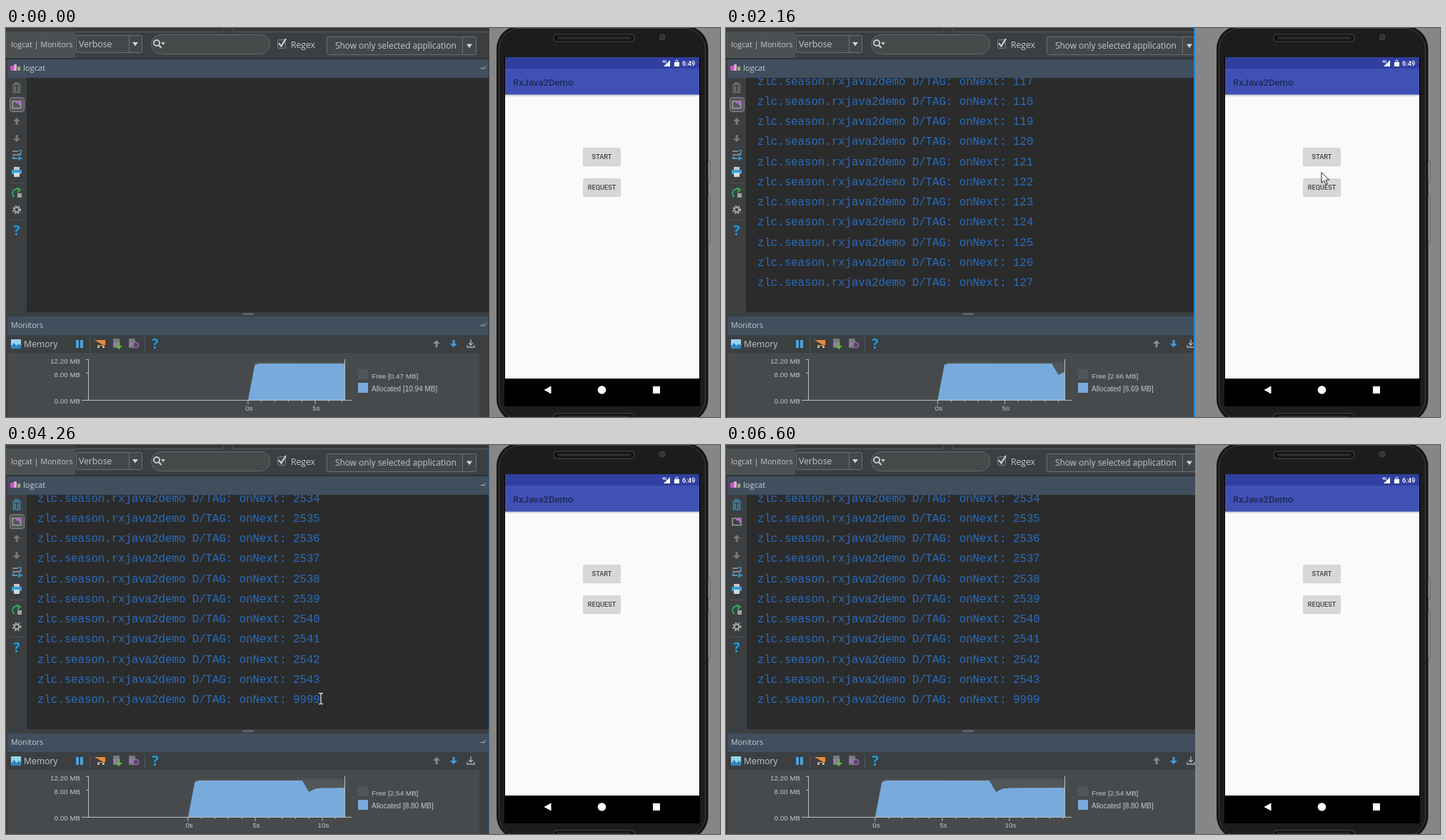
These frames come from a looping animation (1000 px wide and 546 px high, 6660 ms). An HTML page with a canvas:

```html
<!DOCTYPE html>
<html lang="en">
<head>
<meta charset="utf-8">
<title>Logcat demo</title>
<style>
  html, body { margin: 0; width: 100%; height: 100%; overflow: hidden; background: #3c3f41; }
  canvas { display: block; }
</style>
</head>
<body>
<canvas id="stage" width="1000" height="546"></canvas>
<script>
const ctx = document.getElementById('stage').getContext('2d');
const LOOP = 6660, STEP = 60;
const UI = '"Open Sans", "Noto Sans", sans-serif';
const PHONE = 'Roboto, sans-serif';
const CHART = '"Liberation Sans", sans-serif';
const MONO = '"Liberation Mono", monospace';

// Moments (ms) when the scene changes hard
const AT = { phoneFocus: 840, firstLog: 960, secondLog: 2460, ideFocus: 4080, select: 4380,
             popup: 4560, unpin: 4860, phoneAgain: 5220, blur: 6540 };

// Pointer stops: time, x, y
const POINTER = [
  [60, 962, 104], [600, 845, 182], [960, 845, 182], [1440, 399, 390], [1560, 399, 390],
  [2040, 833, 180], [2280, 835, 225], [2460, 835, 225], [2760, 571, 339], [2880, 571, 339],
  [3360, 841, 222], [3660, 751, 256], [3720, 745, 258], [4080, 441, 356], [4320, 441, 356],
  [4500, 403, 328], [4680, 449, 344], [5040, 836, 226], [5640, 827, 226], [5880, 827, 226],
  [6480, 934, 172]
];

// Memory samples: seconds, MB
const MEMORY = [[0, 0], [.5, 10.5], [.8, 10.94], [8.5, 10.94], [9, 7.5], [9.5, 8.5], [10, 8.65], [11, 8.75], [16, 8.8]];

function rect(x, y, w, h, fill) { ctx.fillStyle = fill; ctx.fillRect(x, y, w, h); }

function round(x, y, w, h, r, fill, stroke, width = 1) {
  ctx.beginPath();
  ctx.roundRect(x, y, w, h, r);
  paint(fill, stroke, width);
}

function circle(x, y, r, fill, stroke, width = 1) {
  ctx.beginPath();
  ctx.arc(x, y, r, 0, 7);
  paint(fill, stroke, width);
}

function paint(fill, stroke, width = 1) {
  if (fill) { ctx.fillStyle = fill; ctx.fill(); }
  if (stroke) { ctx.strokeStyle = stroke; ctx.lineWidth = width; ctx.stroke(); }
}

function text(str, x, y, size, color, family = UI, align = 'left', weight = 400) {
  ctx.font = `${weight} ${size}px ${family}`;
  ctx.textAlign = align;
  ctx.textBaseline = 'alphabetic';
  ctx.fillStyle = color;
  ctx.fillText(str, x, y);
}

// Draws an SVG path moved to x, y
function shape(d, x, y, fill, stroke, width) {
  ctx.save();
  ctx.translate(x, y);
  const path = new Path2D(d);
  if (fill) { ctx.fillStyle = fill; ctx.fill(path); }
  if (stroke) { ctx.strokeStyle = stroke; ctx.lineWidth = width || 1; ctx.stroke(path); }
  ctx.restore();
}

function line(x1, y1, x2, y2, color) { shape(`M${x1} ${y1}L${x2} ${y2}`, 0, 0, null, color); }

const ARROW_UP = 'M0 -5L5 0H1.5V5H-1.5V0H-5Z';
const ARROW_DOWN = 'M0 5L5 0H1.5V-5H-1.5V0H-5Z';
const CARET = 'M-4 -2.5H4L0 3Z';

function drawToolbar() {
  rect(0, 0, 678, 546, '#3c3f41');
  rect(97, 0, 580, 4, '#35383a');
  shape('M97 5.5H302Q305 5 305 0M317 0Q317 5.5 320 5.5H677', 0, 0, null, '#555a5c');
  rect(0, 5, 97, 37, '#4c5052');
  text('logcat | Monitors', 7, 27, 10.7, '#c4c8ca');

  round(98.5, 10.5, 92, 24, 2, '#43474a', '#6b7073');
  line(172.5, 11, 172.5, 34, '#6b7073');
  text('Verbose', 102, 27, 12.2, '#c4c8ca');
  shape(CARET, 181, 22.5, '#d0d4d6');

  round(203.5, 9.5, 166, 27, 13.5, '#45494a', '#65696b');
  circle(211, 21, 4, null, '#c8c8c8', 2);
  shape('M3 3L6.5 7', 211, 21, null, '#c8c8c8', 2.4);
  shape('M-3 -2H3L0 2Z', 220, 22, '#c8c8c8');

  round(380.5, 16.5, 11, 12, 2, '#43474a', '#7b7f81');
  shape('M382 21L385.5 25.5L392 15', 0, 0, null, '#d5d8da', 2);
  text('Regex', 399, 28, 12.1, '#c4c8ca');
  round(449.5, 12.5, 209, 25, 2, '#43474a', '#6b7073');
  line(639.5, 13, 639.5, 37, '#6b7073');
  text('Show only selected application', 461, 29, 11.9, '#c4c8ca');
  shape(CARET, 649, 25, '#d0d4d6');

  rect(0, 42, 678, 2, '#303335');
  rect(2, 44, 674, 26, '#414e5e');
  round(6, 53, 5, 7, 1, '#d64fc4');
  round(11, 51, 4, 9, 1, '#e3a5dc');
  round(16, 54, 4, 6, 1, '#8bc34a');
  text('logcat', 24, 60, 11.2, '#c9ced2');
}

function drawSidebar(t) {
  const live = t >= AT.ideFocus, pinned = t < AT.unpin;
  const trash = live ? '#3592c4' : '#74787a';
  shape('M-6 -4.5H6M-2 -5V-7H2V-5M-4.5 -3V6.5H4.5V-3M-1.7 -2V5M1.7 -2V5', 15, 84, null, trash, 1.6);
  if (pinned) round(5.5, 97.5, 20, 20, 3, '#55595b', '#85898b');
  shape('M-6 -4.5H6V5H-6Z', 15, 107.5, null, '#9a9ea0', 1.5);
  shape('M-1 -3H6V3H3V0H-1Z', 15, 106, '#b06bc8');
  shape(ARROW_UP, 15, 131, '#77797b');
  shape(ARROW_DOWN, 15, 155, '#77797b');
  shape('M-6 -5H2M-6 0H6M-6 5H1', 15, 178, null, '#9aa0a3', 1.5);
  shape('M3 -6H6V-2L3 -1M-3 2L-6 4L-3 6M3 3V7L7 5Z', 15, 178, null, '#389fd6', 1.4);
  rect(11, 195, 8, 4, '#c5c8ca');
  rect(8, 199, 14, 6, '#389fd6');
  rect(11, 203, 8, 6, '#d5d8da');
  line(5, 217.5, 25, 217.5, '#515557');
  shape('M3 -5A5.5 5.5 0 1 0 -3 5M0 -8L5 -5L1 -1', 15, 232, null, '#35a853', 2);
  rect(16, 232, 6, 6, '#a0a4a6');
  ctx.setLineDash([2, 2]);
  circle(15, 255, 4.8, null, '#a2a6a8', 3);
  ctx.setLineDash([]);
  circle(15, 255, 3.2, null, '#a2a6a8', 2);
  line(5, 269.5, 25, 269.5, '#515557');
  text('?', 15, 291, 19, '#1e9fe0', UI, 'center', 700);
}

function drawLog(t) {
  const left = t >= AT.phoneFocus && t < AT.ideFocus ? 28 : 29;
  rect(left, 70, 647, 329, '#2b2b2b');
  if (t >= AT.firstLog) {
    ctx.save();
    ctx.beginPath();
    ctx.rect(left, 70, 647, 329);
    ctx.clip();
    const selected = t >= AT.select && t < AT.phoneAgain;
    if (selected) {
      rect(403, 314, 273, 28, '#214283');
      rect(44, 342, 396, 28, '#214283');
      rect(402, 315, 2, 27, '#c8ccd0');
      rect(666, 374, 10, 25, '#4b4e50');
    }
    for (let row = 0; row <= 10; row++) {
      const later = t >= AT.secondLog;
      const n = !later ? 117 + row : row < 10 ? 2534 + row : 9999;
      text(`zlc.season.rxjava2demo D/TAG: onNext: ${n}`, 44, 79.5 + row * 28.28, 15.71, '#2a6dbd', MONO);
    }
    if (selected && t >= AT.popup) round(423, 285, 29, 29, 4, '#8ccaf5');
    ctx.restore();
  }
  for (let i = 0; i < 5; i++) line(332 + i * 3, 403, 334 + i * 3, 400, '#a5a9ab');
}

function drawMonitorBars() {
  rect(2, 405, 674, 26, '#414e5e');
  text('Monitors', 7, 421, 10.7, '#c9ced2');
  for (const y of [56, 417]) {
    line(664, y + .5, 670, y + .5, '#9ba3ab');
    shape('M0 -2L2.5 0L0 2M4 -3V-1', 668, y, null, '#9ba3ab');
  }
  rect(7, 437, 14, 13, '#2b86bd');
  shape('M7 447L11 442L15 446L18 443L21 446V437H7Z', 0, 0, '#9bd3ee');
  text('Memory', 25, 448, 12.1, '#c4c8ca');
  rect(98, 438, 4, 11, '#4f9fdb');
  rect(104, 438, 4, 11, '#4f9fdb');
  line(117.5, 434, 117.5, 453, '#55595b');
  shape('M124 438H128V446H138M128 438H139V445H128Z', 0, 0, '#e88b3c');
  for (const x of [128, 135]) round(x, 446, 3, 3, 1.5, '#d5d5d5');
  for (const x of [150, 172]) {
    round(x, 436, 9, 13, 1, '#777b7d');
    rect(x + 1, 441, 4, 5, '#b06bc8');
  }
  shape(ARROW_DOWN, 158, 446, '#62b543');
  circle(182, 445, 4, '#5c4668', '#a47cb8');
  line(194.5, 434, 194.5, 453, '#55595b');
  text('?', 209, 450, 19, '#1e9fe0', UI, 'center', 700);
  shape(ARROW_UP, 603, 443, '#888c8e');
  shape(ARROW_DOWN, 627, 443, '#3d9ee0');
  shape('M0 -6V2M-3 -1L0 2L3 -1M-5 2V5H5V2', 651, 443, null, '#b0b4b6', 1.3);
}

function memoryAt(s) {
  const i = Math.max(1, MEMORY.findIndex(p => p[0] >= s));
  const [a, b] = [MEMORY[i - 1], MEMORY[i]];
  return a[1] + (b[1] - a[1]) * (s - a[0]) / (b[0] - a[0]);
}

function legend(t) {
  if (t < 1260) return ['0.47', '10.94'];
  if (t < 1800) return ['3.67', '7.68'];
  if (t < 2280) return ['2.66', '8.69'];
  if (t < 3240) return ['2.56', '8.79'];
  if (t < 4200) return ['2.55', '8.79'];
  return ['2.54', '8.80'];
}

function drawChart(t) {
  rect(2, 456, 661, 90, '#464a4c');
  const PER_SECOND = 18.8, RIGHT = 474, BASE = 522;
  const origin = 339 - t * .0197;
  const end = (RIGHT - origin) / PER_SECOND;
  const yOf = mb => BASE - mb * 4.67;
  const area = (points, color) => {
    ctx.beginPath();
    ctx.moveTo(origin, BASE);
    for (const [s, mb] of points) ctx.lineTo(origin + s * PER_SECOND, yOf(mb));
    ctx.lineTo(RIGHT, BASE);
    paint(color);
  };
  area([[.5, 11], [.8, 11.4], [end, 11.36]], '#515658');
  area([...MEMORY.filter(p => p[0] < end), [end, memoryAt(end)]], '#78abdc');

  const axis = '#b9bdbf';
  line(115.5, 465, 115.5, BASE, axis);
  line(106, 522.5, 484, 522.5, axis);
  line(474.5, 465, 474.5, BASE, axis);
  for (const y of [465, 484]) line(112, y + .5, 116, y + .5, axis);
  text('12.20 MB', 104, 471, 9.8, '#c4c8ca', CHART, 'right');
  text('8.00 MB', 104, 490, 9.8, '#c4c8ca', CHART, 'right');
  text('0.00 MB', 104, 527, 9.8, '#c4c8ca', CHART, 'right');
  for (let s = 0; s <= end; s++) {
    const x = origin + s * PER_SECOND;
    line(x, 522, x, s % 5 ? 525 : 528, axis);
    if (s % 5 === 0) text(s + 's', x + 1.5, 537, 9.8, '#c4c8ca', CHART, 'center');
  }
  const [free, used] = legend(t);
  rect(493, 479, 14, 14, '#515658');
  rect(493, 498, 14, 14, '#78abdc');
  text(`Free [${free} MB]`, 512, 491.5, 9.9, '#c4c8ca', CHART);
  text(`Allocated [${used} MB]`, 512, 510, 10, '#c4c8ca', CHART);
}

function drawButton(label, y, color) {
  round(808, y + 1, 53, 25, 2, '#cfcfcf');
  round(808, y, 53, 25, 2, color);
  text(label, 834.5, y + 16, 9.2, '#444', PHONE, 'center', 500);
}

// Draws the emulator side and returns where it begins
function drawPhone(t) {
  const ideFront = t >= AT.ideFocus && t < AT.phoneAgain;
  const phoneFront = t >= AT.phoneFocus && !ideFront;
  const edge = phoneFront ? 657 : 677;
  rect(edge, 0, 1000 - edge, 546, '#868686');
  if (phoneFront && t < AT.blur) rect(655, 0, 2, 546, '#1a86d8');
  if (ideFront) rect(676, 0, 1, 546, '#2a6a94');

  round(982, 186, 4, 30, 1, '#9b9b9b', '#5b5b5b');
  round(982, 234, 4, 66, 1, '#9b9b9b', '#5b5b5b');
  round(687, -3, 296.5, 556, 32, '#161616');
  round(690.5, .5, 289, 549, 29, '#1c1c1c', '#414141');
  for (const y of [9, 541]) {
    round(767, y, 113, 10, 4, '#111', '#4b4b4b');
    round(772, y + 3, 103, 4, 2, '#2b2b2b');
  }
  circle(919, 13, 4, '#30343a', '#444');
  rect(698, 41, 274, 490, '#000');
  rect(699, 41, 272, 451, '#fafafa');
  rect(699, 41, 272, 16, '#303f9f');
  rect(699, 57, 272, 36, '#3f51b5');
  rect(699, 93, 272, 1, '#8089b5');
  rect(699, 94, 272, 2, '#dedfe4');
  text('RxJava2Demo', 710, 80.5, 13.1, '#20294f', PHONE, 'left', 500);
  text('4G', 919, 49, 5, '#fff', PHONE, 'left', 700);
  shape('M930 45V54H921Z', 0, 0, '#fff');
  rect(936, 48, 7, 6, '#fff');
  shape('M937.5 48V46.5A1.5 1.5 0 0 1 940.5 46.5V48', 0.5, 0, null, '#fff');
  text('6:49', 947, 53, 9.3, '#fff', PHONE, 'left', 500);

  const pressed = t >= 2340 && t < 2940 || t >= 5160 && t < 5400;
  drawButton('START', 168, '#d6d7d7');
  drawButton('REQUEST', 211, pressed ? '#cbcccc' : '#d6d7d7');

  shape('M763.5 502.5V513.5L753.5 508Z', 0, 0, '#fff');
  circle(834.5, 508, 5.8, '#fff');
  rect(906, 503, 10, 10, '#fff');
  return edge;
}

function drawPointer(t, edge) {
  if (t < POINTER[0][0] || t >= AT.blur) return;
  const next = POINTER.findIndex(p => p[0] > t);
  let [, x, y] = POINTER[POINTER.length - 1];
  if (next > 0) {
    const [a, b] = [POINTER[next - 1], POINTER[next]];
    const u = (t - a[0]) / (b[0] - a[0]), ease = u * u * (3 - 2 * u);
    x = a[1] + (b[1] - a[1]) * ease;
    y = a[2] + (b[2] - a[2]) * ease;
  }
  if (x < edge && y > 70 && y < 399) {
    shape('M-3 -7.5H-1L0 -6.5L1 -7.5H3M0 -6.5V6.5M-3 7.5H-1L0 6.5L1 7.5H3', x, y, null, '#d8d8d8', 1.3);
  } else {
    shape('M0 0V15L3.6 11.6L6 17L8.3 16L6 10.7H10.7Z', x, y, '#fff', '#222');
  }
}

function frame(now) {
  const t = Math.floor(now % LOOP / STEP) * STEP;
  drawToolbar();
  drawSidebar(t);
  drawLog(t);
  drawMonitorBars();
  drawChart(t);
  drawPointer(t, drawPhone(t));
  requestAnimationFrame(frame);
}
frame(0);
</script>
</body>
</html>
```
